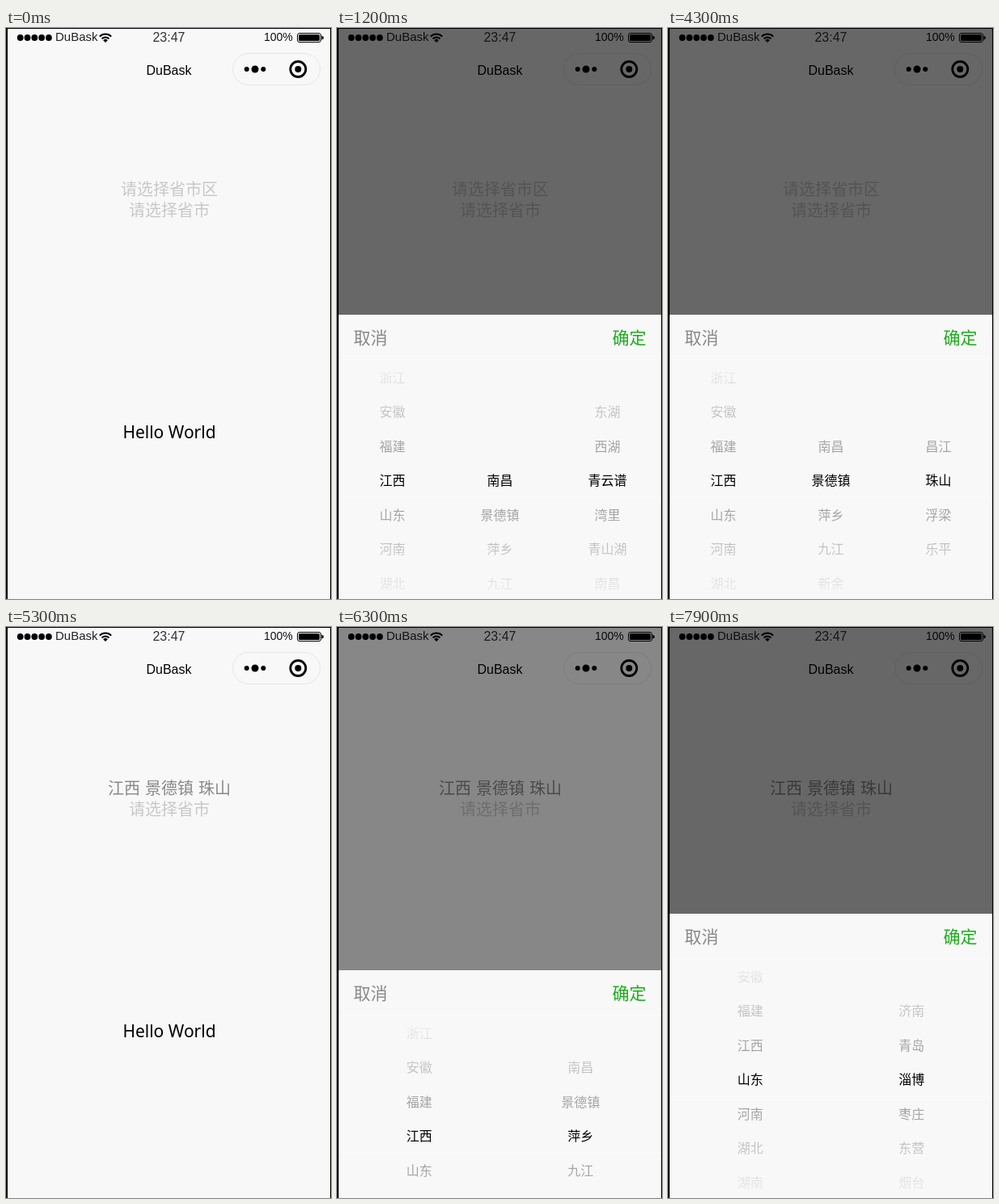
An HTML page for the animation above (8000 ms loop, 402x707 px).

```html
<!DOCTYPE html>
<html lang="zh-CN">
<head>
<meta charset="utf-8">
<title>Region picker</title>
<style>
  html, body { margin: 0; width: 100%; height: 100%; overflow: hidden; background: #000; }
  #stage { display: block; width: 402px; height: 707px; }
  text { font-family: "Noto Sans CJK SC", "Noto Sans CJK", sans-serif; }
  .latin { font-family: "Liberation Sans", Arial, sans-serif; }
  .mid { text-anchor: middle; }
  .field { font-size: 20px; fill: #c8c8c8; word-spacing: 1.5px; }
  .field.chosen { fill: #888; }
  .action { font-size: 21px; }
  .row { font-size: 16px; text-anchor: middle; }
</style>
</head>
<body>
<svg id="stage" viewBox="0 0 402 707">
  <defs>
    <linearGradient id="fadeTop" x1="0" y1="0" x2="0" y2="1">
      <stop offset="0" stop-color="#f8f8f8" stop-opacity=".99"/>
      <stop offset="1" stop-color="#f8f8f8" stop-opacity=".6"/>
    </linearGradient>
    <linearGradient id="fadeBottom" x1="0" y1="0" x2="0" y2="1">
      <stop offset="0" stop-color="#f8f8f8" stop-opacity=".6"/>
      <stop offset="1" stop-color="#f8f8f8" stop-opacity=".99"/>
    </linearGradient>
  </defs>

  <rect x="2" y="1" width="399" height="706" fill="#f8f8f8"/>

  <!-- status bar -->
  <g id="signal"></g>
  <text class="latin" x="61" y="16" font-size="15" fill="#222">DuBask</text>
  <g fill="none" stroke="#000" stroke-width="2">
    <path d="M115.8 10.6A10.2 10.2 0 0 1 130.2 10.6"/>
    <path d="M118.5 13.4A6.4 6.4 0 0 1 127.5 13.4"/>
  </g>
  <path d="M120.2 15.2A4 4 0 0 1 125.8 15.2L123 18Z"/>
  <text class="latin mid" x="201.5" y="17" font-size="16" fill="#333">23:47</text>
  <text class="latin" x="319" y="16" font-size="14" fill="#111">100%</text>
  <rect x="360.5" y="6.5" width="29" height="11" rx="2.5" fill="none" stroke="#000"/>
  <rect x="362" y="8" width="26" height="8" rx="1.5"/>
  <path d="M390.5 9.5Q393 10 393 12T390.5 14.5Z"/>

  <!-- navigation bar -->
  <text class="latin mid" x="201.5" y="58" font-size="16">DuBask</text>
  <rect x="280.5" y="31.5" width="108" height="39" rx="19.5" fill="none" stroke="#e6e6e6"/>
  <circle cx="297.7" cy="51" r="3"/>
  <circle cx="308" cy="51" r="4.5"/>
  <circle cx="318.3" cy="51" r="3"/>
  <circle cx="361.3" cy="51" r="9.5" fill="none" stroke="#000" stroke-width="2.8"/>
  <circle cx="361.3" cy="51" r="4"/>

  <!-- page -->
  <text id="region" class="field mid" x="202" y="206.5"></text>
  <text class="field mid" x="202" y="232.5">请选择省市</text>
  <text class="mid" x="202" y="508" font-size="21" style="font-family:'Noto Sans','Open Sans',sans-serif">Hello World</text>

  <rect id="shade" x="2" y="1" width="399" height="706"/>

  <g id="panel">
    <rect x="2" width="399" height="360" fill="#f8f8f8"/>
    <svg x="2" y="55" width="399" height="302" overflow="hidden">
      <g id="wheels"></g>
      <rect width="399" height="130" fill="url(#fadeTop)"/>
      <rect y="172" width="399" height="130" fill="url(#fadeBottom)"/>
      <path d="M0 .5H399M0 171.5H399" stroke="#fcfcfc"/>
    </svg>
    <text class="action" x="20.5" y="35.5" fill="#888">取消</text>
    <text class="action" x="340.5" y="35.5" fill="#1aad19">确定</text>
  </g>
</svg>

<script>
const LOOP = 8000, ROW = 42.5, PANEL_TOP = 355, PANEL_HEIGHT = 352;
const $ = id => document.getElementById(id);
const words = s => s.split(' ');

const provinces = words('浙江 安徽 福建 江西 山东 河南 湖北 湖南 广东');
const jiangxi = words('南昌 景德镇 萍乡 九江 新余 鹰潭 赣州');
const shandong = words('济南 青岛 淄博 枣庄 东营 烟台 潍坊');
const nanchang = words('东湖 西湖 青云谱 湾里 青山湖 南昌 新建');
const jingdezhen = words('昌江 珠山 浮梁 乐平');

// Each track is a list of [start time, value]; values hold until the next one.
const opening = [[0, 0], [1000, .574], [1100, .925], [1200, 1], [5200, .3], [5300, 0],
                 [6200, .216], [6300, .8], [6400, .98], [6500, 1]];
const cityTurn = [[0, 0], [3100, .36], [3200, .82], [3300, 1]];
const districtTurn = [[0, 2], [3600, 1], [3700, .2], [3800, 0],
                      [4000, .3], [4100, .75], [4200, .95], [4300, 1]];
const provinceTurn = [[0, 3], [7600, 3.36], [7700, 3.82], [7800, 4]];

function at(track, t) {
  let value = track[0][1];
  for (const [start, v] of track) if (t >= start) value = v;
  return value;
}

function wheelsAt(t) {
  if (t < 6200) return [
    [provinces, 3],
    [jiangxi, at(cityTurn, t)],
    [t < 3500 ? nanchang : jingdezhen, at(districtTurn, t)]
  ];
  return [[provinces, at(provinceTurn, t)], [t < 7900 ? jiangxi : shandong, 2]];
}

function wheel([items, selected], column, all) {
  const x = 399 * (column + .5) / all.length;
  return items.map((name, i) =>
    `<text class="row" x="${x}" y="${156.3 + (i - selected) * ROW}">${name}</text>`).join('');
}

function draw(t) {
  const open = at(opening, t);
  const chosen = t >= 5200;
  $('region').textContent = chosen ? '江西 景德镇 珠山' : '请选择省市区';
  $('region').classList.toggle('chosen', chosen);
  $('shade').setAttribute('fill-opacity', .585 * open ** 1.09);
  $('panel').setAttribute('transform', `translate(0 ${Math.round(PANEL_TOP + PANEL_HEIGHT * (1 - open))})`);
  $('wheels').innerHTML = wheelsAt(t).map(wheel).join('');
}

$('signal').innerHTML = [0, 1, 2, 3, 4].map(i =>
  `<ellipse cx="${17.7 + i * 8.8}" cy="12" rx="3.9" ry="4"/>`).join('');

let shown = -1;
function tick() {
  const t = Math.floor(performance.now() % LOOP / 100) * 100;
  if (t !== shown) draw(shown = t);
  requestAnimationFrame(tick);
}
tick();
</script>
</body>
</html>
```
